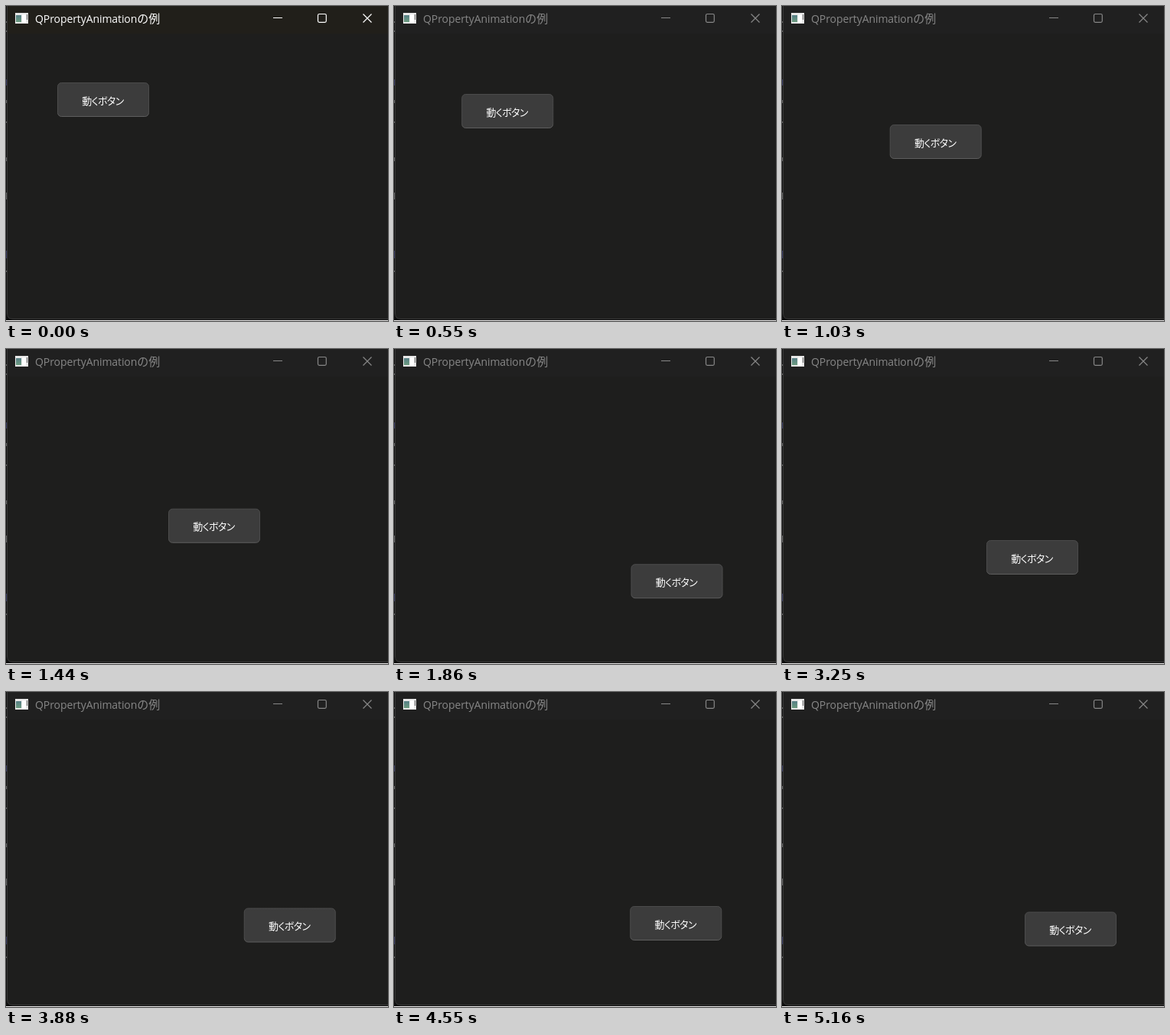
An HTML page for the animation above (5230 ms loop, 499 by 412 pixels).

```html
<!DOCTYPE html>
<html lang="ja">
<head>
<meta charset="utf-8">
<style>
html, body { margin: 0; width: 100%; height: 100%; overflow: hidden; background: #0d0d0d; }
svg { display: block; }
text { font-family: "Open Sans", "Noto Sans CJK JP", "Noto Sans CJK", sans-serif; }
.cjk { font-family: "Noto Sans CJK JP", "Noto Sans CJK", sans-serif; }
#bar { --ink: #fff; --bar: #211f1a; }
#bar.idle { --ink: #878787; --bar: #202020; }
#bar text { fill: var(--ink); font-size: 14px; letter-spacing: -.08px; }
#bar .cjk { font-size: 15px; }
#caps { fill: none; stroke: var(--ink); stroke-width: 1.2; }
#label { font-size: 13px; fill: #fff; font-weight: 300; letter-spacing: -.6px; font-feature-settings: "palt"; text-anchor: middle; }
</style>
</head>
<body>
<svg width="499" height="412" viewBox="0 0 499 412">
  <defs>
    <linearGradient id="edge" x2="0" y2="1">
      <stop offset=".85" stop-color="#4b4b4b"/>
      <stop offset="1" stop-color="#5e5e5e"/>
    </linearGradient>
    <linearGradient id="teal" x2="0" y2="1">
      <stop stop-color="#567f86"/>
      <stop offset="1" stop-color="#6d9c80"/>
    </linearGradient>
    <clipPath id="win"><path d="M1 0H499V410H9Q1 410 1 402Z"/></clipPath>
  </defs>

  <!-- slivers of the window behind -->
  <path d="M.5 20v2M.5 32v2M.5 123v4M.5 151v2M.5 198v5M.5 244v9M.5 346v2" stroke="#606060"/>
  <path d="M.5 96v8M.5 320v10" stroke="#30345c"/>
  <path d="M0 411.5H499" stroke="#f0eeee"/>

  <g id="bar" clip-path="url(#win)">
    <path d="M0 0H499V412H0Z" fill="#1e1e1d"/>
    <path d="M0 0H499V36H0Z" fill="var(--bar)"/>
    <path d="M1.5 0V402Q1.5 409.5 9 409.5H499" fill="none" stroke="#3a3a3a"/>
    <path d="M12 9h17v14h-17Z" fill="#e8e8e8"/>
    <path d="M13 12h7v9h-7Z" fill="url(#teal)"/>
    <path d="M21 11h5v11h-5Z" fill="#fff"/>
    <path d="M27 11h1v7h-1Z" fill="#666"/>
    <text x="38" y="21.5">QPropertyAnimation<tspan class="cjk">の例</tspan></text>
    <g id="caps">
      <path d="M349 15.5h12M466.500 10.500l11 11M477.500 10.500l-11 11"/>
      <rect x="407.500" y="10.500" width="10.800" height="10.800" rx="1.800"/>
    </g>
  </g>

  <g id="button">
    <rect x=".5" y=".5" width="119" height="44" rx="5" fill="#3c3c3c" stroke="url(#edge)"/>
    <text id="label" class="cjk" x="59.500" y="28.500">動くボタン</text>
  </g>
</svg>
<script>
const LOOP = 5230, DURATION = 5187;
// each stretch between two marks holds eight repaints
const marks = [-340, 210, 760, 1310, 1860, 2420, 2970, 3530, 4090, 4630, 5160, 5230];
const bar = document.getElementById("bar");
const button = document.getElementById("button");

function repaintTime(ms) {
  const i = marks.findIndex((m, k) => ms >= m && ms < marks[k + 1]);
  const start = marks[i], step = (marks[i + 1] - start) / 8;
  const time = start + Math.floor((ms - start + 15) / step) * step;
  return Math.max(0, Math.floor(time / 10) * 10);
}

function outBounce(t) {
  if (t > .99) return 1;
  const [mid, low] = t < 4 / 11 ? [0, 0]
    : t < 8 / 11 ? [6 / 11, .75]
    : t < 10 / 11 ? [9 / 11, .9375]
    : [10.5 / 11, .984375];
  return 7.5625 * (t - mid) ** 2 + low;
}

// whole logical pixels at 125 % display scale
const scaled = v => Math.floor(v + .1) * 1.25;

function draw(now) {
  const time = repaintTime(now % LOOP);
  const p = outBounce(time / DURATION);
  bar.classList.toggle("idle", time >= 70);
  button.setAttribute("transform", `translate(${67 + scaled(200 * p)} ${100 + scaled(150 * p)})`);
}

let begin;
function tick(now) {
  begin ??= now;
  draw(now - begin);
  requestAnimationFrame(tick);
}
draw(0);
requestAnimationFrame(tick);
</script>
</body>
</html>
```
